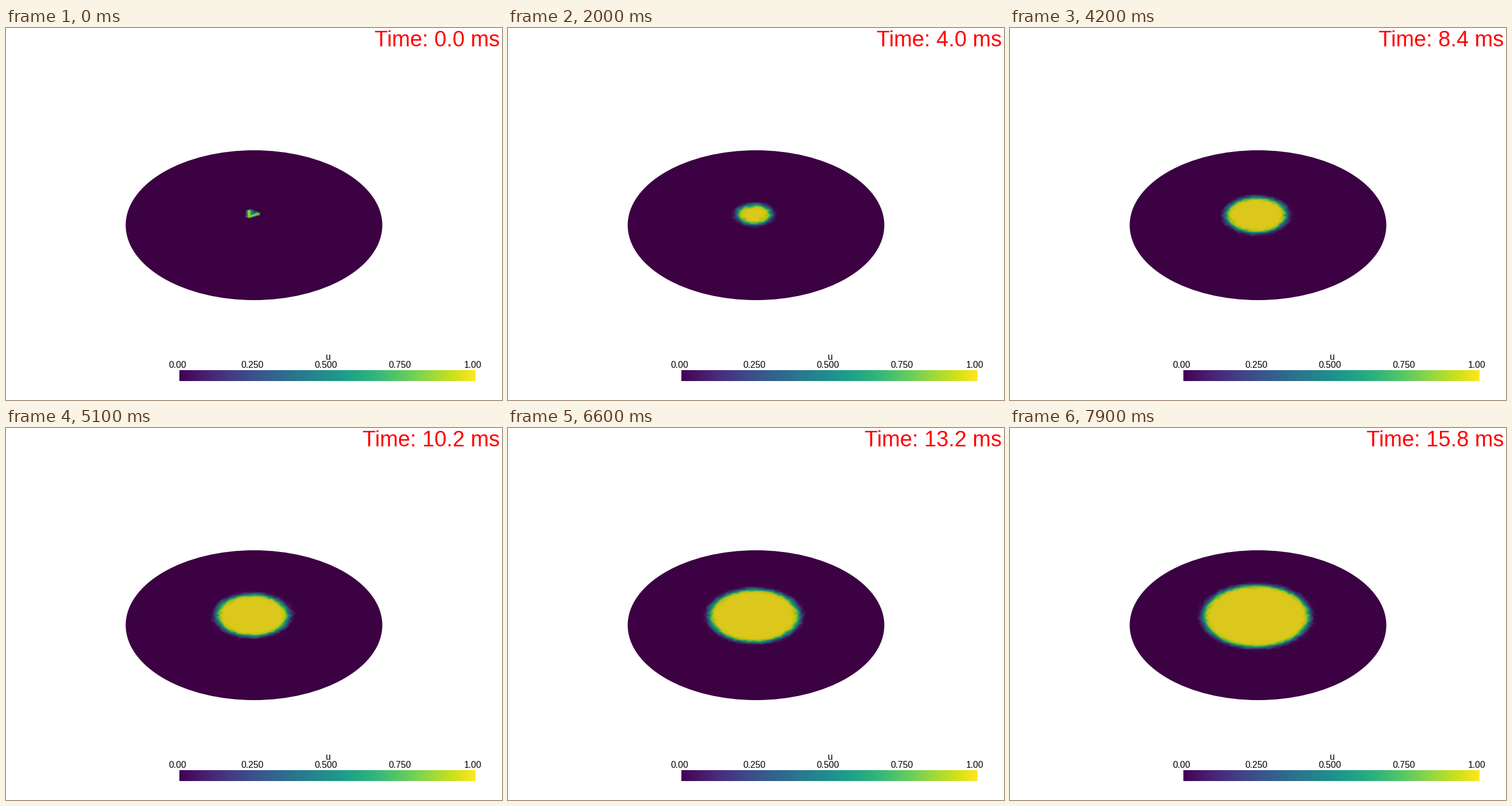
Recreate the animation shown at these times as a matplotlib script. Size 864 by 648 pixels, loop 8 s.

```python
import numpy as np
import matplotlib.pyplot as plt
from matplotlib.animation import FuncAnimation
from matplotlib.colors import ListedColormap
from matplotlib.patches import Ellipse
from matplotlib.tri import Triangulation

W, H, DPI = 864, 648, 100
FRAMES, INTERVAL = 80, 100
TILT = 0.584                      # vertical squash of the disc
X0, X1, Y0, Y1 = 300, 560, 250, 410   # region the wave can reach

plt.rcParams["font.family"] = "Liberation Sans"

# Viridis dimmed by the scene light
viridis = plt.get_cmap("viridis", 256)
lit = ListedColormap(viridis(np.arange(256))[:, :3] * [0.87, 0.865, 0.79])


def make_mesh(step=9):
    """Jittered triangle mesh; its first three points are the stimulus."""
    rng = np.random.default_rng(4)
    seed = np.array([(422.5, 318), (423.5, 329), (440, 324)])
    ring = np.array([(418, 317), (426, 315), (443.5, 321),
                     (443.5, 326.5), (424, 332.5), (416, 329.5)])
    mids = (ring + np.roll(ring, -1, axis=0)) / 2
    rows = np.arange(Y0 - 10, Y1 + 10, step * 0.866 * TILT)
    cols = np.arange(X0 - 20, X1 + 20, step)
    pts = np.array([(x + step / 2 * (j % 2), y)
                    for j, y in enumerate(rows) for x in cols])
    pts += rng.uniform(-0.22, 0.22, pts.shape) * [step, step * TILT]
    away = np.hypot(pts[:, 0] - 430, (pts[:, 1] - 323.7) / TILT) > 20
    pts = np.vstack([seed, ring, mids, pts[away]])
    return pts, Triangulation(pts[:, 0], pts[:, 1] / TILT)


def pixel_weights(tri):
    """Corner indices and barycentric weights for every pixel."""
    px, py = np.meshgrid(np.arange(X0, X1) + 0.5, np.arange(Y0, Y1) + 0.5)
    py = py / TILT
    corners = tri.triangles[tri.get_trifinder()(px, py)]
    (ax_, bx, cx), (ay, by, cy) = (np.moveaxis(v[corners], -1, 0)
                                   for v in (tri.x, tri.y))
    det = (by - cy) * (ax_ - cx) + (cx - bx) * (ay - cy)
    wa = ((by - cy) * (px - cx) + (cx - bx) * (py - cy)) / det
    wb = ((cy - ay) * (px - cx) + (ax_ - cx) * (py - cy)) / det
    return corners, np.stack([wa, wb, 1 - wa - wb], axis=-1)


pts, tri = make_mesh()
corners, weights = pixel_weights(tri)


def field(t):
    """Excitation u at time t, interpolated linearly over the mesh."""
    radius = 8.4 + 5.34 * t
    width = 2.1 - 1.85 * np.exp(-t / 0.8)
    dist = np.hypot(pts[:, 0] - 429.2, (pts[:, 1] - 323.6 - 0.27 * t) / TILT)
    dist[:3] = 0
    u = 1 / (1 + np.exp(np.clip((dist - radius) / width, -50, 50)))
    return (u[corners] * weights).sum(axis=-1)


fig = plt.figure(figsize=(W / DPI, H / DPI), dpi=DPI, facecolor="white")
ax = fig.add_axes([0, 0, 1, 1])
ax.axis("off")


def label(x, y, text, px, **kw):
    return ax.text(x, y, text, fontsize=px * 72 / DPI, va="baseline", **kw)


ax.add_patch(Ellipse((432, 343.5), 447, 261, fc=lit(0), lw=0))
wave = ax.imshow(field(0), cmap=lit, vmin=0, vmax=1, aspect="auto",
                 extent=(X0, X1, Y1, Y0), interpolation="nearest", zorder=2)
ax.imshow(np.linspace(0, 1, 256)[None], cmap=viridis, aspect="auto",
          extent=(302, 817.5, 615, 596), interpolation="nearest")
ax.set_xlim(0, W)
ax.set_ylim(H, 0)

for x, tick in zip((298.5, 429, 557.5, 686.5, 813.5),
                   ("0.00", "0.250", "0.500", "0.750", "1.00")):
    label(x, 591.5, tick, 15.8, ha="center", color="black")
label(561.5, 578.5, "u", 15.8, ha="center", color="black")
clock = label(860, 32.5, "", 38, ha="right", color="red")


def update(i):
    t = i * 0.2
    wave.set_data(field(t))
    clock.set_text(f"Time: {t:.1f} ms")
    return wave, clock


anim = FuncAnimation(fig, update, frames=FRAMES, interval=INTERVAL,
                     repeat=True, repeat_delay=0)
plt.show()
```
